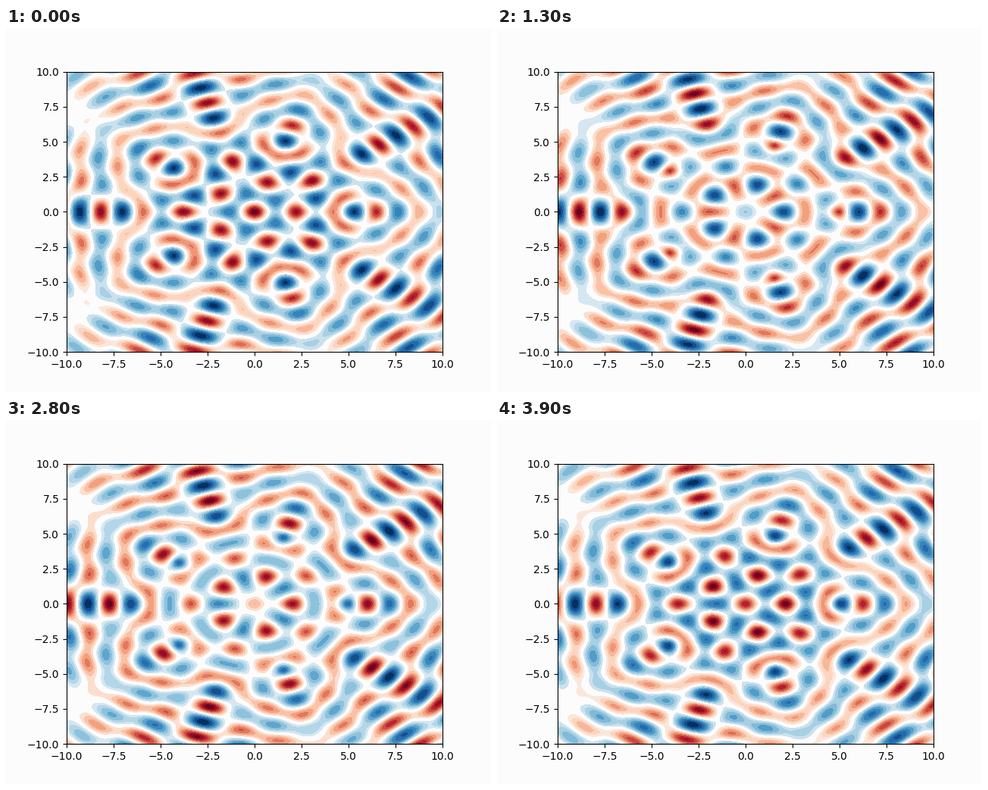
Recreate the animation shown at these times as a matplotlib script. Size 640x480 px, loop 4000 ms.

```python
import numpy as np
import matplotlib.pyplot as plt
from matplotlib.animation import FuncAnimation

FRAMES = 40
PERIOD = 10          # frames per wave cycle
SOURCES = 5
RADIUS = 5.0
WAVELENGTH = 2.0
STEP = 0.5           # contour spacing
PAPER = "#fcfcfc"

axis = np.linspace(-10, 10, 200)
X, Y = np.meshgrid(axis, axis)
angles = 2 * np.pi * np.arange(SOURCES) / SOURCES
distances = [np.hypot(X - RADIUS * np.cos(a), Y - RADIUS * np.sin(a))
             for a in angles]

fig, ax = plt.subplots(figsize=(6.4, 4.8), dpi=100, facecolor=PAPER)
contours = None


def field(frame):
    """Sum of circular waves leaving every source."""
    phase = 2 * np.pi * (frame % PERIOD) / PERIOD
    k = 2 * np.pi / WAVELENGTH
    return sum(np.cos(k * d - phase) for d in distances)


def bands(z):
    """Contour levels covering z, with one colour per band."""
    low, high = np.floor(z.min() / STEP), np.ceil(z.max() / STEP)
    levels = np.arange(low, high + 1) * STEP
    mids = (levels[:-1] + levels[1:]) / 2
    colors = plt.get_cmap("RdBu")((mids - mids[0]) / (mids[-1] - mids[0]))
    colors[np.abs(mids) < STEP] = plt.matplotlib.colors.to_rgba(PAPER)
    return levels, colors


def draw(frame):
    global contours
    if contours is not None:
        contours.remove()
    z = field(frame)
    levels, colors = bands(z)
    contours = ax.contourf(X, Y, z, levels=levels, colors=colors)
    ax.set(xlim=(-10, 10), ylim=(-10, 10))
    return [contours]


anim = FuncAnimation(fig, draw, frames=FRAMES, interval=100,
                     init_func=lambda: draw(0), repeat=True,
                     repeat_delay=0, blit=False)
plt.show()
```
